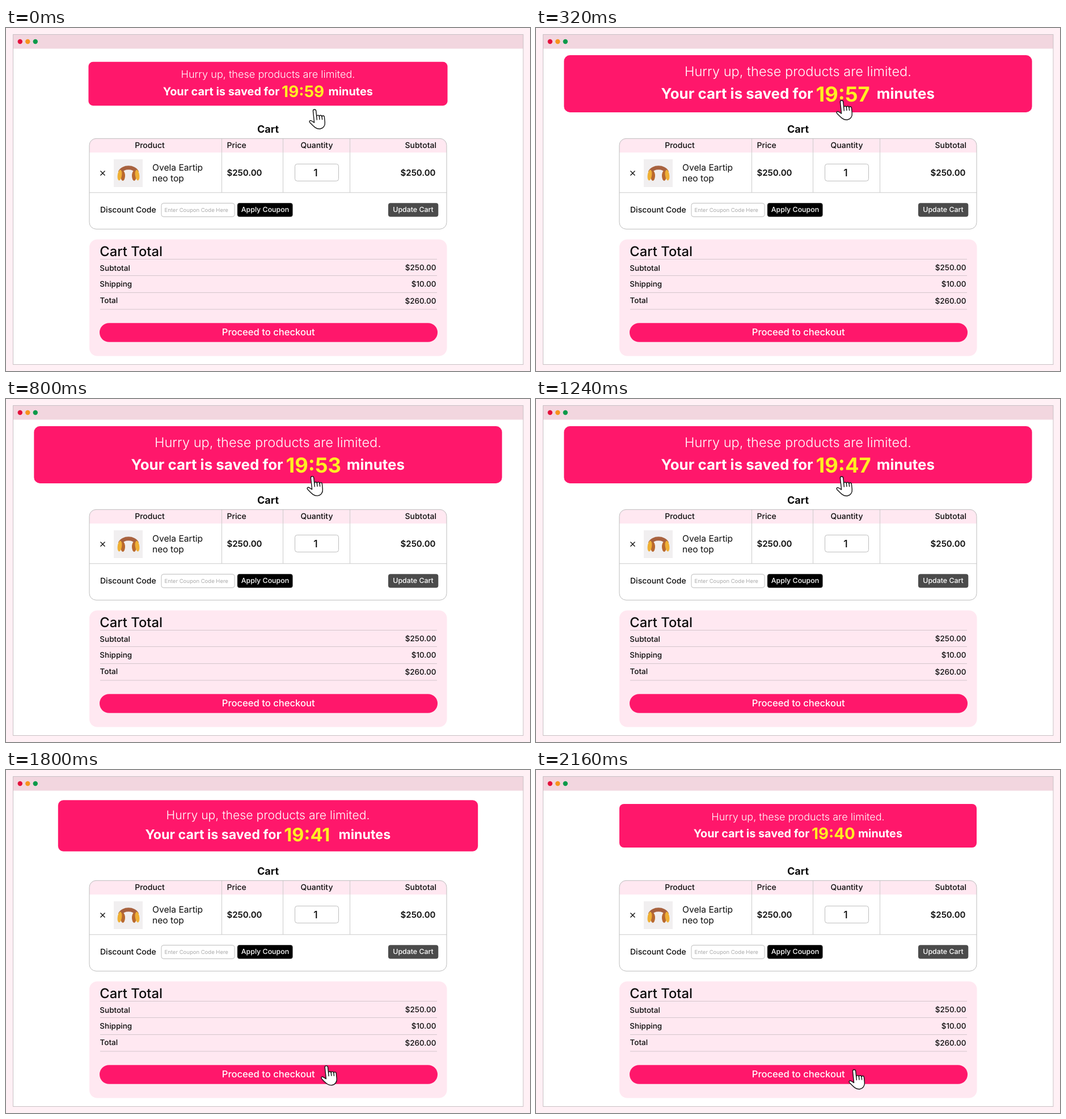
An HTML page for the animation above (2.72 s loop, 924 by 606 pixels).

```html
<!DOCTYPE html>
<html lang="en">
<head>
<meta charset="utf-8">
<title>Cart countdown</title>
<style>
  html, body { margin: 0; width: 100%; height: 100%; overflow: hidden; background: #fff0f5; }
  svg { display: block; width: 924px; height: 606px; }
  text { font: 500 14px Inter, Arial, sans-serif; fill: #0c0c0c; text-rendering: geometricPrecision; }
  .mid { text-anchor: middle; }
  .end { text-anchor: end; }
  .light { font-size: 18px; font-weight: 300; fill: #fff; }
  .strong { font-size: 19.8px; font-weight: 700; fill: #fff; }
  #timer { font-size: 27.8px; font-weight: 700; fill: #ffee22; }
  .heading { font-size: 18px; font-weight: 700; }
  .name { font-size: 15.6px; font-weight: 400; }
  .price { font-size: 15px; font-weight: 600; }
  .hint { font-size: 9.5px; font-weight: 400; fill: #aaa; }
  .button { font-size: 12.4px; fill: #fff; }
  .row text { font-size: 13.5px; }
  .pink { fill: #ff176b; }
  .pale { fill: #ffe8f1; }
  .line { fill: none; stroke: #bdbdbd; }
  .thin { stroke: #cbcbcb; }
</style>
</head>
<body>
<svg viewBox="0 0 924 606">
  <rect x="12.5" y="11.5" width="899.5" height="583" fill="#fff"/>
  <rect x="12.5" y="11.5" width="899.5" height="25" fill="#f2d6df"/>
  <rect x="12.5" y="11.5" width="899.5" height="583" fill="none" stroke="#c8c0c4"/>
  <circle cx="24.8" cy="24" r="4.2" fill="#e3103c"/>
  <circle cx="38.3" cy="24" r="4.2" fill="#f7941d"/>
  <circle cx="51.8" cy="24" r="4.2" fill="#0a9a4a"/>

  <text class="heading mid" x="462" y="184.5">Cart</text>

  <!-- Product table -->
  <path class="pale" d="M147 220V207a12 12 0 0 1 12-12H765a12 12 0 0 1 12 12V220z"/>
  <path class="line thin" d="M380.5 195V291M488.5 195V291M606.5 195V291M147 290.8H777"/>
  <rect class="line" x="147" y="195.3" width="630" height="160" rx="12"/>
  <text class="mid" x="253.5" y="212">Product</text>
  <text x="389.5" y="212">Price</text>
  <text class="mid" x="548" y="212">Quantity</text>
  <text class="end" x="759" y="212">Subtotal</text>

  <path d="M166.5 252.5l8 8m0-8l-8 8" stroke="#111" stroke-width="1.4"/>
  <rect x="190" y="232" width="51" height="49" fill="#f1eff0"/>
  <path d="M201 255C206 244 226 244 231 255" fill="none" stroke="#a8623f" stroke-width="7"/>
  <g fill="#b9692f">
    <ellipse cx="206" cy="261" rx="4" ry="9"/>
    <ellipse cx="226" cy="261" rx="4" ry="9"/>
  </g>
  <g fill="#efb035">
    <ellipse cx="200.5" cy="260" rx="3.7" ry="9.5" transform="rotate(8 200.5 260)"/>
    <ellipse cx="231.5" cy="260" rx="3.7" ry="9.5" transform="rotate(-8 231.5 260)"/>
  </g>
  <text class="name" x="258" y="252">Ovela Eartip</text>
  <text class="name" x="258" y="270.5">neo top</text>
  <text class="price" x="389.5" y="261">$250.00</text>
  <rect class="line" x="509.5" y="240.3" width="77" height="30" rx="4"/>
  <text class="mid" x="546" y="262" style="font-size:18px">1</text>
  <text class="price end" x="757.5" y="261">$250.00</text>

  <text x="166" y="325.5">Discount Code</text>
  <rect class="line" x="274" y="309.5" width="129" height="24" rx="4"/>
  <text class="hint" x="279.5" y="325">Enter Coupon Code Here</text>
  <rect x="408" y="309.2" width="97.5" height="24.3" rx="4"/>
  <text class="button mid" x="457" y="325.3">Apply Coupon</text>
  <rect x="674" y="309.2" width="88.3" height="24.3" rx="4" fill="#4b4b4b"/>
  <text class="button mid" x="718" y="325.3">Update Cart</text>

  <!-- Totals -->
  <g id="total">
    <rect class="pale" x="147" y="373.5" width="630.5" height="206" rx="14"/>
    <text x="165.3" y="402.5" style="font-size:23.8px">Cart Total</text>
    <path d="M166 408.5H760M166 437.5H760M166 467.5H760M166 497H760" stroke="#d3c6cc"/>
    <g class="row">
      <text x="165.3" y="429">Subtotal</text>
      <text class="end" x="758.5" y="428.3">$250.00</text>
      <text x="165.3" y="457">Shipping</text>
      <text class="end" x="758.5" y="457">$10.00</text>
      <text x="165.5" y="486.3">Total</text>
      <text class="end" x="758.5" y="487.3">$260.00</text>
    </g>
    <rect class="pink" x="165" y="521.2" width="596" height="33.6" rx="16.8"/>
    <text class="mid" x="462.7" y="542.8" style="font-size:16.6px;fill:#fff">Proceed to checkout</text>
  </g>

  <!-- Countdown banner -->
  <g id="banner">
    <rect class="pink" x="147" y="60" width="630" height="77" rx="8"/>
    <text class="light mid" x="462" y="88.5">Hurry up, these products are limited.</text>
    <text class="strong end" x="482.3" y="118.5">Your cart is saved for</text>
    <text id="timer" x="486" y="122.3"></text>
    <text class="strong" x="568" y="118.5">minutes</text>
  </g>

  <g id="hand" fill="#fff" stroke="#111" stroke-width="1.4" stroke-linejoin="round" stroke-linecap="round">
    <path d="M-6 5.5V-14.8a2.6 2.6 0 0 1 5.2 0V-4.5c0-3 4.7-3 4.7.3c.3-2.8 4.6-2.6 4.6.8c.3-2.3 4.2-2 4.2 1V7C12.7 13 8.5 17.6 3 17.6C-4 17.6-7 13-13.8 4.5c-1.6-2.4 1-4.4 3.2-2.6z"/>
    <path d="M-.8-4.5V1M3.9-4.2V1M8.5-3.4V1.5" fill="none"/>
  </g>
</svg>
<script>
  const LOOP = 2720, STEP = 40;
  const [banner, total, timer, hand] =
    ["banner", "total", "timer", "hand"].map(id => document.getElementById(id));

  const span = (t, a, b) => Math.min(1, Math.max(0, (t - a) / (b - a)));
  const sine = p => (1 - Math.cos(Math.PI * p)) / 2;
  const cubic = p => p < .5 ? 4 * p ** 3 : 1 - 4 * (1 - p) ** 3;
  const linear = p => p;

  // Value at time t along [time, value] keys.
  function along(keys, t, ease = sine) {
    const i = keys.findIndex(k => k[0] > t);
    if (i < 0) return keys[keys.length - 1][1];
    if (i === 0) return keys[0][1];
    const [a, from] = keys[i - 1], [b, to] = keys[i];
    return from + (to - from) * ease(span(t, a, b));
  }

  const growth = [[-25, 1], [285, 1.31], [1690, 1.31], [1930, 1]];
  const press = [[1850, 0], [1960, 1], [2000, 1], [2160, 0]];
  const seconds = [[0, 59.9], [320, 57.3], [800, 53.1], [1240, 47.6], [1640, 43.5], [1960, 40]];
  const handX = [[0, 549], [320, 544], [560, 545], [800, 545], [1240, 544]];
  const handY = [[0, 161], [320, 145], [560, 153.5], [1240, 154]];

  const zoom = (el, x, y, s) =>
    el.setAttribute("transform", `translate(${x} ${y}) scale(${s}) translate(${-x} ${-y})`);

  function draw(t) {
    zoom(banner, 462, 98.5, along(growth, t));
    const down = along(press, t);
    zoom(total, 462, 476.5, 1 - .053 * down);
    timer.textContent = "19:" + Math.floor(along(seconds, t, linear));

    // The hand sweeps to the button on an arc bowed to the right.
    const sweep = cubic(span(t, 1545, 1850));
    const x = along(handX, t) + 22 * sweep + 244 * sweep * (1 - sweep);
    const y = along(handY, t) + 392.5 * sweep;
    hand.setAttribute("transform", `translate(${x} ${y}) rotate(-6) scale(${1 - .28 * down})`);
  }

  const start = performance.now();
  function tick() {
    const t = (performance.now() - start) % LOOP;
    draw(Math.floor(t / STEP) * STEP);
    requestAnimationFrame(tick);
  }
  tick();
</script>
</body>
</html>
```
